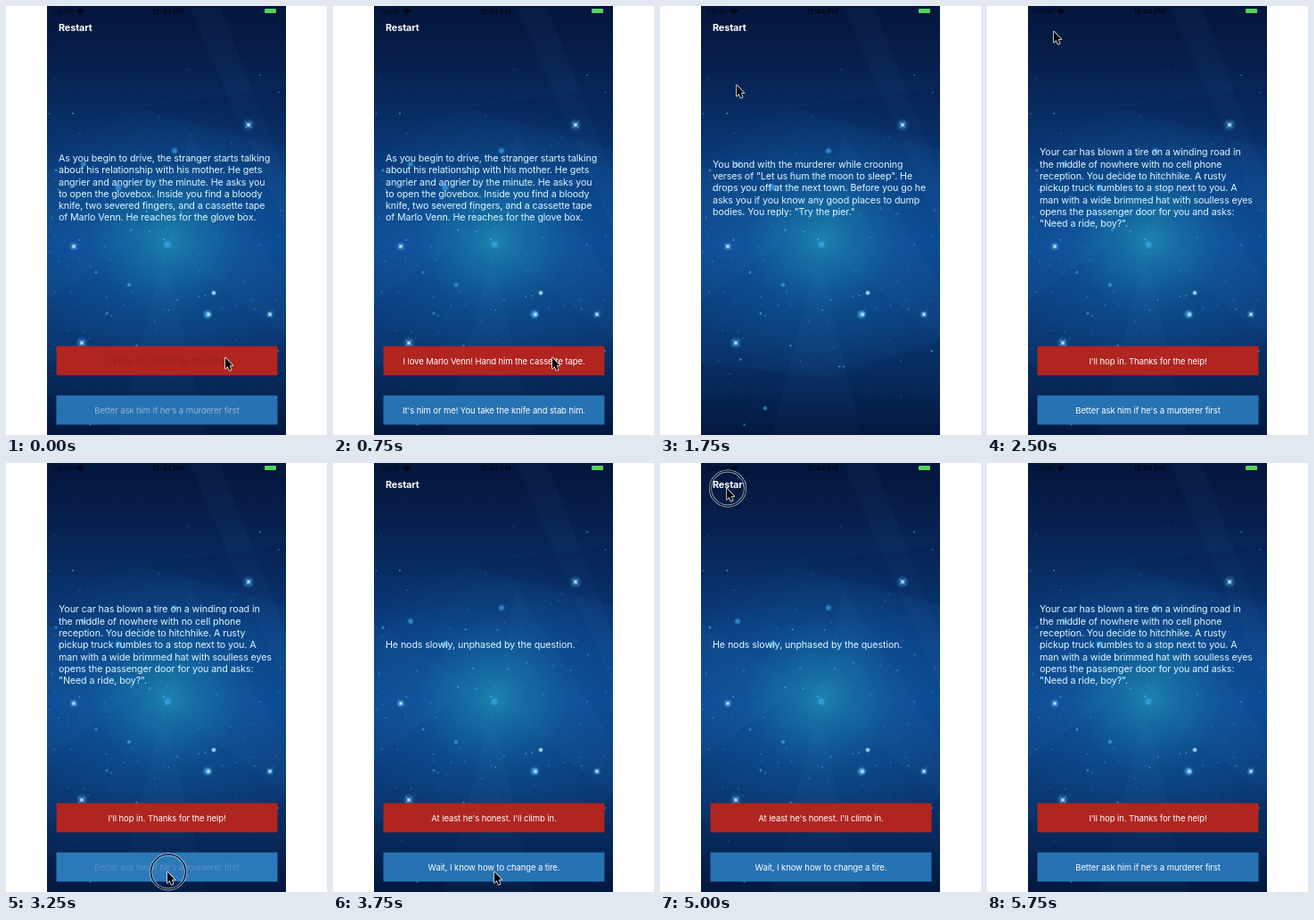
These frames come from a looping animation (360 by 480 pixels, 6000 ms). An HTML page with a canvas:

```html
<!DOCTYPE html>
<html lang="en">
<head>
<meta charset="utf-8">
<title>Hitchhiker story</title>
<style>
html, body { margin: 0; width: 100%; height: 100%; overflow: hidden; background: #fff; }
canvas { display: block; width: 360px; height: 480px; }
</style>
</head>
<body>
<canvas id="stage" width="360" height="480"></canvas>
<script>
const STEP = 250, LOOP = 6000;
const PHONE = { x: 46, y: 0, w: 268, h: 480 };
const FONT = 'Inter, "Noto Sans", sans-serif';
const RED = '#b0251f', BLUE = '#2672b3';
const ctx = document.getElementById('stage').getContext('2d');

const scenes = {
  start: {
    text: ['Your car has blown a tire on a winding road in', 'the middle of nowhere with no cell phone',
      'reception. You decide to hitchhike. A rusty', 'pickup truck rumbles to a stop next to you. A',
      'man with a wide brimmed hat with soulless eyes', 'opens the passenger door for you and asks:',
      '"Need a ride, boy?".'],
    choices: ["I'll hop in. Thanks for the help!", "Better ask him if he's a murderer first"]
  },
  drive: {
    text: ['As you begin to drive, the stranger starts talking', 'about his relationship with his mother. He gets',
      'angrier and angrier by the minute. He asks you', 'to open the glovebox. Inside you find a bloody',
      'knife, two severed fingers, and a cassette tape', 'of Marlo Venn. He reaches for the glove box.'],
    choices: ['I love Marlo Venn! Hand him the cassette tape.', "It's him or me! You take the knife and stab him."]
  },
  bond: {
    text: ['You bond with the murderer while crooning', 'verses of "Let us hum the moon to sleep". He',
      'drops you off at the next town. Before you go he', 'asks you if you know any good places to dump',
      'bodies. You reply: "Try the pier."'],
    choices: []
  },
  nods: {
    text: ['He nods slowly, unphased by the question.'],
    choices: ["At least he's honest. I'll climb in.", 'Wait, I know how to change a tire.']
  }
};

// Each key holds from its time until the next one; x, y is the pointer tip.
const keys = [
  { at: 0, scene: 'drive', x: 246, y: 393, pressed: 0, leaving: 'start' },
  { at: 250, scene: 'drive', x: 246, y: 393 },
  { at: 1250, scene: 'drive', x: 246, y: 393, pressed: 0, ring: true },
  { at: 1500, scene: 'bond', x: 190, y: 270 },
  { at: 1750, scene: 'bond', x: 86, y: 88 },
  { at: 2000, scene: 'bond', x: 77, y: 32 },
  { at: 2250, scene: 'bond', x: 75, y: 28, ring: true },
  { at: 2500, scene: 'start', x: 75, y: 28 },
  { at: 2750, scene: 'start', x: 108, y: 160 },
  { at: 3000, scene: 'start', x: 168, y: 410 },
  { at: 3250, scene: 'start', x: 181, y: 457, pressed: 1, ring: true },
  { at: 3500, scene: 'nods', x: 181, y: 457 },
  { at: 4000, scene: 'nods', x: 178, y: 453 },
  { at: 4250, scene: 'nods', x: 175, y: 450 },
  { at: 4500, scene: 'nods', x: 175, y: 450, pressed: 1, ring: true },
  { at: 4750, scene: 'nods', x: 118, y: 210 },
  { at: 5000, scene: 'nods', x: 75, y: 28, ring: true },
  { at: 5250, scene: 'start', x: 75, y: 28 },
  { at: 5500, scene: 'start' }
];

function seeded(seed) {
  return () => (seed = (seed * 16807) % 2147483647) / 2147483647;
}

function gradient(g, stops) {
  stops.forEach(([offset, color]) => g.addColorStop(offset, color));
  return g;
}

function dot(c, x, y, r, color) {
  c.fillStyle = color;
  c.beginPath();
  c.arc(x, y, r, 0, 7);
  c.fill();
}

function glow(c, x, y, r, rgb, alpha) {
  c.fillStyle = gradient(c.createRadialGradient(x, y, 0, x, y, r),
    [[0, `rgba(${rgb},${alpha})`], [0.35, `rgba(${rgb},${alpha * 0.5})`], [1, `rgba(${rgb},0)`]]);
  c.fillRect(x - r, y - r, 2 * r, 2 * r);
}

function facet(c, color, ...points) {
  c.fillStyle = color;
  c.beginPath();
  points.forEach(([x, y]) => c.lineTo(x, y));
  c.fill();
}

function sparkle(c, x, y, size) {
  glow(c, x, y, size * 1.5, '60,180,255', 0.75);
  c.save();
  c.translate(x, y);
  c.rotate(Math.PI / 4);
  c.fillStyle = 'rgba(150,220,255,.6)';
  c.fillRect(-size, -0.3, 2 * size, 0.6);
  c.fillRect(-0.3, -size, 0.6, 2 * size);
  c.restore();
  glow(c, x, y, 3, '255,255,255', 1);
}

function makeSky() {
  const sky = document.createElement('canvas');
  sky.width = 360;
  sky.height = 480;
  const c = sky.getContext('2d');
  const { x, y, w, h } = PHONE;
  c.beginPath();
  c.rect(x, y, w, h);
  c.clip();
  c.fillStyle = gradient(c.createLinearGradient(0, 0, 0, 480),
    [[0, '#04163c'], [0.12, '#061e4a'], [0.25, '#082c62'], [0.4, '#0b3f82'], [0.56, '#0c4891'],
     [0.75, '#0a3b78'], [0.9, '#072a5a'], [1, '#041a42']]);
  c.fillRect(x, y, w, h);
  glow(c, 180, 262, 160, '25,135,195', 0.4);
  glow(c, 180, 262, 85, '40,175,180', 0.42);

  const light = 'rgba(80,160,230,.035)', shade = 'rgba(0,8,40,.1)';
  facet(c, light, [205, 0], [240, 0], [314, 190], [314, 250]);
  facet(c, shade, [148, 114], [314, 92], [314, 160]);
  facet(c, light, [46, 180], [160, 250], [46, 330]);
  facet(c, light, [178, 275], [125, 480], [225, 480]);
  facet(c, light, [205, 140], [314, 310], [314, 370], [180, 270]);
  facet(c, shade, [46, 400], [190, 415], [314, 375], [314, 480], [46, 480]);

  const random = seeded(4127);
  for (let i = 0; i < 330; i++) {
    const px = x + random() * w;
    const py = 60 + (random() + random()) / 2 * 420;
    const alpha = 0.2 + random() ** 2 * 0.6;
    dot(c, px, py, 0.4 + random() ** 3 * 0.9, `rgba(65,180,245,${alpha})`);
  }
  for (const [px, py, r] of [[181, 267, 5], [189, 162, 4], [126, 203, 5], [138, 312, 3], [87, 177, 4],
    [118, 450, 3], [101, 298, 2], [226, 345, 6], [113, 344, 2], [56, 184, 2]]) {
    glow(c, px, py, r * 1.2, '50,165,240', 0.6);
    dot(c, px, py, r * 0.7, 'rgba(70,175,240,.4)');
  }
  for (const [px, py, size] of [[272, 133, 5], [85, 377, 5], [76, 269, 4],
    [296, 345, 3.5], [233, 321, 2.5], [227, 345, 3]]) sparkle(c, px, py, size);
  return sky;
}
const sky = makeSky();

function write(text, x, y, size, color, { weight = 400, align = 'left' } = {}) {
  ctx.font = `${weight} ${size}px ${FONT}`;
  ctx.letterSpacing = '-0.1px';
  ctx.textAlign = align;
  ctx.fillStyle = color;
  ctx.fillText(text, x, y);
}

function drawStatusBar() {
  const dark = 'rgba(0,4,18,.85)';
  write('Carrier', 52, 9, 7.5, dark);
  write('12:44 PM', 182, 9, 8, dark, { weight: 600, align: 'center' });
  ctx.fillStyle = dark;
  ctx.beginPath();
  ctx.moveTo(83, 10);
  ctx.arc(83, 10, 7, -Math.PI * 0.75, -Math.PI * 0.25);
  ctx.fill();
  ctx.fillStyle = '#55d35f';
  ctx.beginPath();
  ctx.roundRect(290, 3, 13, 5, 1);
  ctx.fill();
}

function drawButton(label, index, key) {
  const y = index ? 435.7 : 380.5;
  const pressed = key.pressed === index;
  const dimmed = key.leaving && !pressed;
  ctx.fillStyle = index ? (pressed ? '#2c79b9' : BLUE) : RED;
  ctx.fillRect(56.5, y, 248, 32.7);
  let color = '#fff';
  if (pressed) color = index ? 'rgba(150,185,215,.4)' : 'rgba(90,20,20,.25)';
  else if (dimmed) color = 'rgba(225,238,250,.55)';
  write(label, 180.5, y + 20.4, 9.5, color, { align: 'center' });
}

function drawPointer({ x, y, ring }) {
  if (ring) {
    for (const [width, color] of [[3, 'rgba(225,240,255,.8)'], [1.6, '#071326']]) {
      ctx.lineWidth = width;
      ctx.strokeStyle = color;
      ctx.beginPath();
      ctx.arc(x + 1, y + 0.5, 19.5, 0, 7);
      ctx.stroke();
    }
  }
  ctx.save();
  ctx.translate(x, y + 0.5);
  ctx.scale(0.88, 0.94);
  ctx.beginPath();
  for (const [px, py] of [[0, 0], [0, 13], [3, 10.3], [5.1, 15.2], [7.6, 14.1], [5.5, 9.4], [9.4, 9.4]])
    ctx.lineTo(px, py);
  ctx.closePath();
  ctx.lineWidth = 1.6;
  ctx.lineJoin = 'round';
  ctx.strokeStyle = '#fff';
  ctx.stroke();
  ctx.fillStyle = '#000';
  ctx.fill();
  ctx.restore();
}

function draw(time) {
  const t = Math.floor((time % LOOP) / STEP) * STEP;
  const key = keys.findLast(k => k.at <= t);
  const scene = scenes[key.scene];
  ctx.fillStyle = '#fff';
  ctx.fillRect(0, 0, 360, 480);
  ctx.drawImage(sky, 0, 0);
  drawStatusBar();
  if (key.scene !== 'start') write('Restart', 59, 28, 10.8, '#fff', { weight: 700 });

  const top = 207.2 - (scene.text.length - 1) / 2 * 13.3;
  scene.text.forEach((line, i) => write(line, 59, top + i * 13.3, 10.7, '#def7ff'));
  const choices = scenes[key.leaving || key.scene].choices;
  choices.forEach((label, i) => drawButton(label, i, key));
  if (key.x !== undefined) drawPointer(key);
}

const began = performance.now();
function tick() {
  draw(performance.now() - began);
  requestAnimationFrame(tick);
}
tick();
</script>
</body>
</html>
```
